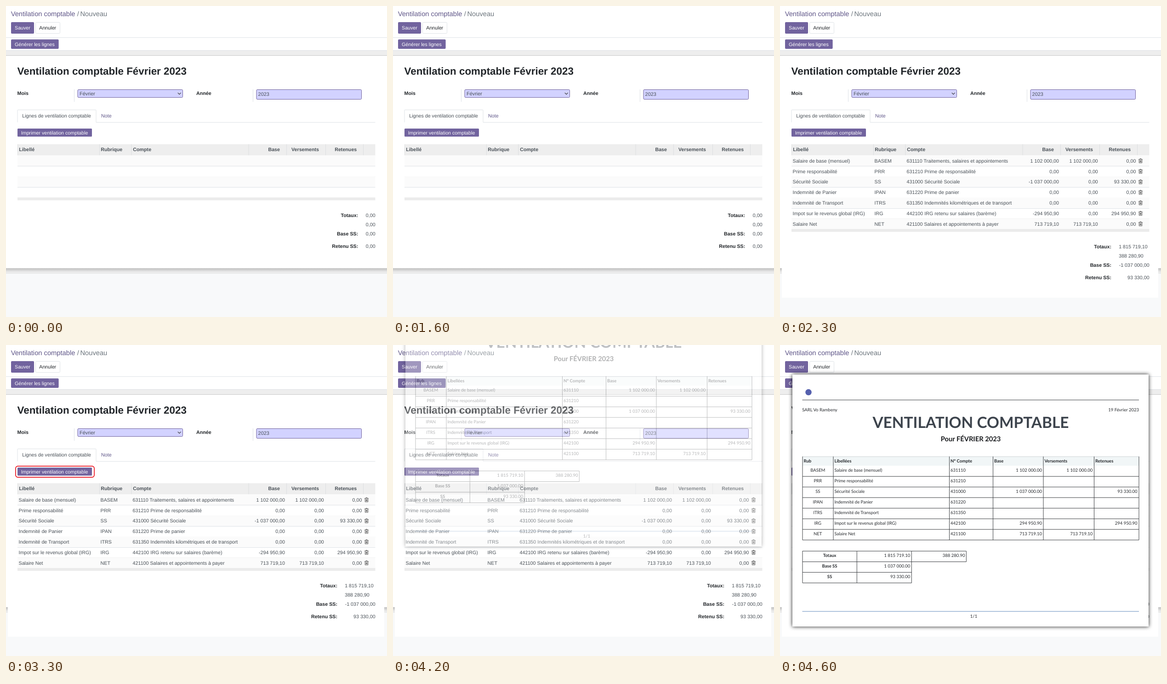
An HTML page that plays this animation: 829 by 675 pixels, repeating every 6600 ms.

```html
<!DOCTYPE html>
<html lang="fr">
<head>
<meta charset="utf-8">
<title>Ventilation comptable</title>
<style>
  html, body { margin: 0; width: 100%; height: 100%; overflow: hidden; background: #fff; }
  svg { display: block; width: 829px; height: 675px; }
  text {
    font: 10.7px "Liberation Sans", Arial, sans-serif;
    fill: #495057;
    text-rendering: geometricPrecision;
  }
  .dark { fill: #212529; }
  .white { fill: #fff; }
  .link { fill: #5f5688; }
  .bold { font-weight: 700; }
  .end { text-anchor: end; }
  .mid { text-anchor: middle; }
  .crumb { font-size: 14.7px; }
  .title { font-size: 22.4px; }
  .input { font-size: 10.9px; }
  .btn { fill: #71639e; }
  .field { fill: #d2d2ff; stroke: #71639e; }
  .rule { fill: none; stroke: #dee2e6; }
  .ring { fill: none; stroke: #ea1420; stroke-width: 1.7; }
  .icon { fill: none; stroke: #4a4a4a; stroke-width: .9; }

  #paper text { font-family: Lato, sans-serif; font-size: 9.5px; fill: #24272b; }
  #paper .head { font-size: 33.4px; fill: #3d444d; }
  #paper .sub { font-size: 14.7px; fill: #16181b; }
  .sheet { fill: #fff; filter: drop-shadow(0 0 4px rgba(0, 0, 0, .9)); }
  .grid { fill: none; stroke: #3a3d40; }

  #ring1, #ring2 { opacity: 0; animation: blink1 6.6s step-end infinite; }
  #ring2 { animation-name: blink2; }
  #filled { animation: fill 6.6s linear infinite; }
  #paper { animation: drop 6.6s linear infinite; }

  @keyframes blink1 {
    0%, 18.1818%, 24.2424%, 100% { opacity: 0; }
    15.1515%, 21.2121% { opacity: 1; }
  }
  @keyframes blink2 {
    0%, 53.0303%, 59.0909%, 100% { opacity: 0; }
    50%, 56.0606% { opacity: 1; }
  }
  @keyframes fill {
    0% { opacity: 0; }
    27.2727% { opacity: 0; animation-timing-function: steps(6, start); }
    36.3636%, 100% { opacity: 1; }
  }
  @keyframes drop {
    0% { opacity: 0; transform: translateY(-261px); }
    62.1212% { opacity: 0; transform: translateY(-261px); animation-timing-function: steps(6, start); }
    71.2121%, 100% { opacity: 1; transform: translateY(0); }
  }
</style>
</head>
<body>
<svg viewBox="0 0 829 675">
  <defs>
    <pattern id="hatch" width="3" height="3" patternUnits="userSpaceOnUse">
      <rect width="3" height="3" fill="#f4f4f4"/>
      <path d="M0 0h1v1h-1zM1 1h1v1h-1zM2 2h1v1h-1z" fill="#e2e2e2"/>
    </pattern>
    <linearGradient id="shade" x2="0" y2="1">
      <stop stop-color="#000" stop-opacity=".2"/>
      <stop offset="1" stop-color="#000" stop-opacity="0"/>
    </linearGradient>
    <path id="bin" class="icon" d="M0 2h9M3 2v-1.5h3v1.5M1.3 2v7.5h6.4v-7.5M3.2 4v4M4.5 4v4M5.8 4v4"/>
  </defs>

  <g id="form">
    <rect width="829" height="675" fill="#fff"/>
    <path class="rule" d="M0 68.5h829M0 96.5h829"/>
    <rect y="97" width="829" height="10" fill="url(#hatch)"/>
    <path d="M0 107.5h829" stroke="#c8c8c8"/>
    <rect y="569" width="829" height="11" fill="url(#hatch)"/>
    <rect y="569" width="829" height="9" fill="url(#shade)"/>
    <path d="M0 569.5h829" stroke="#c8c8c8"/>
    <rect y="580" width="829" height="95" fill="#f8f9fa"/>
    <path d="M0 580h829" stroke="#dedede"/>

    <text class="crumb link" x="10.7" y="21.5">Ventilation comptable</text>
    <text class="crumb" x="154.8" y="21.5" style="fill:#6c757d">/</text>
    <text class="crumb" x="161.5" y="21.5" style="fill:#6c757d">Nouveau</text>

    <rect class="btn" x="11" y="35" width="50" height="25" rx="2"/>
    <text class="white" x="19" y="51.3">Sauver</text>
    <rect class="rule" x="64.5" y="35.5" width="53" height="24" rx="2"/>
    <text class="dark" x="72.3" y="51.3">Annuler</text>
    <rect class="btn" x="11" y="72.5" width="103.6" height="20.5" rx="2"/>
    <text class="white" x="19" y="86.7">Générer les lignes</text>

    <text class="title bold dark" x="24.5" y="148.6">Ventilation comptable Février 2023</text>
    <path class="rule" d="M148.5 181v27M537.5 181v27"/>
    <text class="bold dark" x="24.6" y="193">Mois</text>
    <text class="bold dark" x="414" y="193">Année</text>
    <rect class="field" x="156" y="181.5" width="228.5" height="17" rx="2"/>
    <text class="input" x="160" y="193.8">Février</text>
    <path d="M373.8 188.3l3.4 3.4l3.4-3.4" fill="none" stroke="#333" stroke-width="1.1"/>
    <rect class="field" x="545" y="181.5" width="228.5" height="21" rx="2"/>
    <text class="input" x="548.6" y="195.4">2023</text>

    <path class="rule" d="M25 252.5v-26q0-1 1-1h169q1 0 1 1v26h607.5"/>
    <text x="35.3" y="242.4">Lignes de ventilation comptable</text>
    <text class="link" x="207" y="242.4">Note</text>
    <rect class="btn" x="25" y="266" width="162" height="17.5" rx="1.5"/>
    <text class="white" x="32.8" y="278.7">Imprimer ventilation comptable</text>

    <rect x="25" y="300" width="778.5" height="24.3" fill="#eee"/>
    <path d="M25.5 300v24M203.5 300v24M273 300v24M528 300v24M610.5 300v24M695.5 300v24M777.5 300v24" stroke="#dcdee0"/>
  </g>
  <g id="filled">
    <rect x="4" y="324.5" width="819" height="308.5" fill="#fff"/>
  </g>
  <rect id="ring1" class="ring" x="7" y="68.2" width="111.6" height="29" rx="5.5"/>
  <rect id="ring2" class="ring" x="20.9" y="262.9" width="171.2" height="24.2" rx="5"/>
  <g id="paper">
    <rect class="sheet" x="27" y="64" width="775" height="547"/>
    <circle cx="62" cy="102.5" r="6.8" fill="#5560ae"/>
    <path class="grid" d="M48.5 119.3h732.5"/>
    <path d="M48.5 578.3h732.5" stroke="#95b0d2" stroke-width="1.6"/>
    <rect x="49" y="242" width="732" height="20" fill="#f1f6f7"/>
    <path d="M49 242.3h732" stroke="#cdd3d6"/>
  </g>
</svg>
<script>
  const $ = id => document.getElementById(id);
  const add = (id, parts) => $(id).insertAdjacentHTML('beforeend', parts.join(''));
  const text = (x, y, s, cls = '') => `<text x="${x}" y="${y}" class="${cls}">${s}</text>`;
  const path = (d, cls) => `<path d="${d}" class="${cls}"/>`;
  const vline = (y, h) => x => `M${x} ${y}v${h}`;

  const rows = [
    ['Salaire de base (mensuel)', 'BASEM', '631110 Traitements, salaires et appointements', '1 102 000,00', '1 102 000,00', '0,00'],
    ['Prime responsabilité', 'PRR', '631210 Prime de responsabilité', '0,00', '0,00', '0,00'],
    ['Sécurité Sociale', 'SS', '431000 Sécurité Sociale', '-1 037 000,00', '0,00', '93 330,00'],
    ['Indemnité de Panier', 'IPAN', '631220 Prime de panier', '0,00', '0,00', '0,00'],
    ['Indemnité de Transport', 'ITRS', '631350 Indemnités kilométriques et de transport', '0,00', '0,00', '0,00'],
    ['Impot sur le revenus global (IRG)', 'IRG', '442100 IRG retenu sur salaires (barème)', '-294 950,90', '0,00', '294 950,90'],
    ['Salaire Net', 'NET', '421100 Salaires et appointements à payer', '713 719,10', '713 719,10', '0,00']
  ];

  // Striped list body closed by a grey bar
  const stripes = n => {
    const out = [];
    for (let i = 0; i < n; i++) {
      const y = 324.5 + 22.8 * i;
      if (i % 2 === 0) out.push(`<rect x="25" y="${y}" width="778.5" height="22.8" fill="#fbfbfb"/>`);
      if (i < n - 1) out.push(path(`M25 ${Math.round(y + 22.8) + .5}h778.5`, 'rule'));
    }
    out.push(`<rect x="25" y="${324.3 + 22.8 * n}" width="778.5" height="6.2" fill="#ebebeb"/>`);
    return out;
  };

  const totals = (x, y) => [['Totaux:', 0], ['Base SS:', 40.4], ['Retenu SS:', 67.4]]
    .map(([s, dy]) => text(x, y + dy, s, 'bold dark end'));

  add('form', [
    text(28.3, 315, 'Libellé', 'bold'),
    text(206.3, 315, 'Rubrique', 'bold'),
    text(276.3, 315, 'Compte', 'bold'),
    text(596, 315, 'Base', 'bold end'),
    text(681, 315, 'Versements', 'bold end'),
    text(763.3, 315, 'Retenues', 'bold end'),
    ...stripes(4),
    ...totals(766.3, 457.6),
    ...[0, 20.4, 40.4, 67.4].map(dy => text(803.6, 457.6 + dy, '0,00', 'end'))
  ]);

  add('filled', [
    ...stripes(7),
    ...rows.flatMap(([label, code, account, ...sums], i) => {
      const y = 339.8 + 22.8 * i;
      return [
        text(27.5, y, label), text(205.6, y, code), text(275.6, y, account),
        ...sums.map((s, k) => text([607, 691.8, 774.4][k], y, s, 'end')),
        `<use href="#bin" x="780" y="${y - 8.8}"/>`
      ];
    }),
    ...totals(721, 526),
    text(737.2, 526, '1 815 719,10'),
    text(737.2, 546.4, '388 280,90'),
    text(803.6, 566.4, '-1 037 000,00', 'end'),
    text(803.6, 593.4, '93 330,00', 'end')
  ]);

  const toPrint = s => s === '0,00' ? '' : s.replace('-', '').replace(',', '.');
  const cols = [49, 116, 368.5, 463.5, 573, 683.5, 781];
  const heads = ['Rub', 'Libellées', 'N° Compte', 'Base', 'Versements', 'Retenues'];

  add('paper', [
    text(48.3, 144, 'SARL Vo Rambeny'),
    text(781, 144, '19 Février 2023', 'end'),
    text(415, 179.5, 'VENTILATION COMPTABLE', 'head bold mid'),
    text(415, 208.7, 'Pour FÉVRIER 2023', 'sub bold mid'),
    path(cols.map(vline(242, 181.2)).join(''), 'grid'),
    ...heads.map((s, i) => text(cols[i] + 2.5, 255.4, s, 'bold')),
    ...rows.flatMap(([label, code, account, ...sums], i) => {
      const y = 274.8 + 23.05 * i;
      return [
        path(`M49 ${285.5 + 23 * i - .3}h732`, 'grid'),
        text(82.3, y, code, 'mid'), text(118.4, y, label), text(371, y, account.split(' ')[0]),
        ...sums.map((s, k) => text([570, 680.2, 777.5][k], y, toPrint(s), 'end'))
      ];
    }),
    path('M49 447.3h356.3v23.2h-356.3M49 493.4h237.3M49 447v69.4h237.3v-69.4M167.3 447v69.4', 'grid'),
    ...[['Totaux', '1 815 719.10'], ['Base SS', '1 037 000.00'], ['SS', '93 330.00']].flatMap(([s, v], i) => [
      text(108, 460 + 23.1 * i, s, 'bold mid'),
      text(283.3, 460 + 23.1 * i, v, 'end')
    ]),
    text(402.6, 460, '388 280.90', 'end'),
    text(421.5, 592, '1/1', 'mid')
  ]);
</script>
</body>
</html>
```
